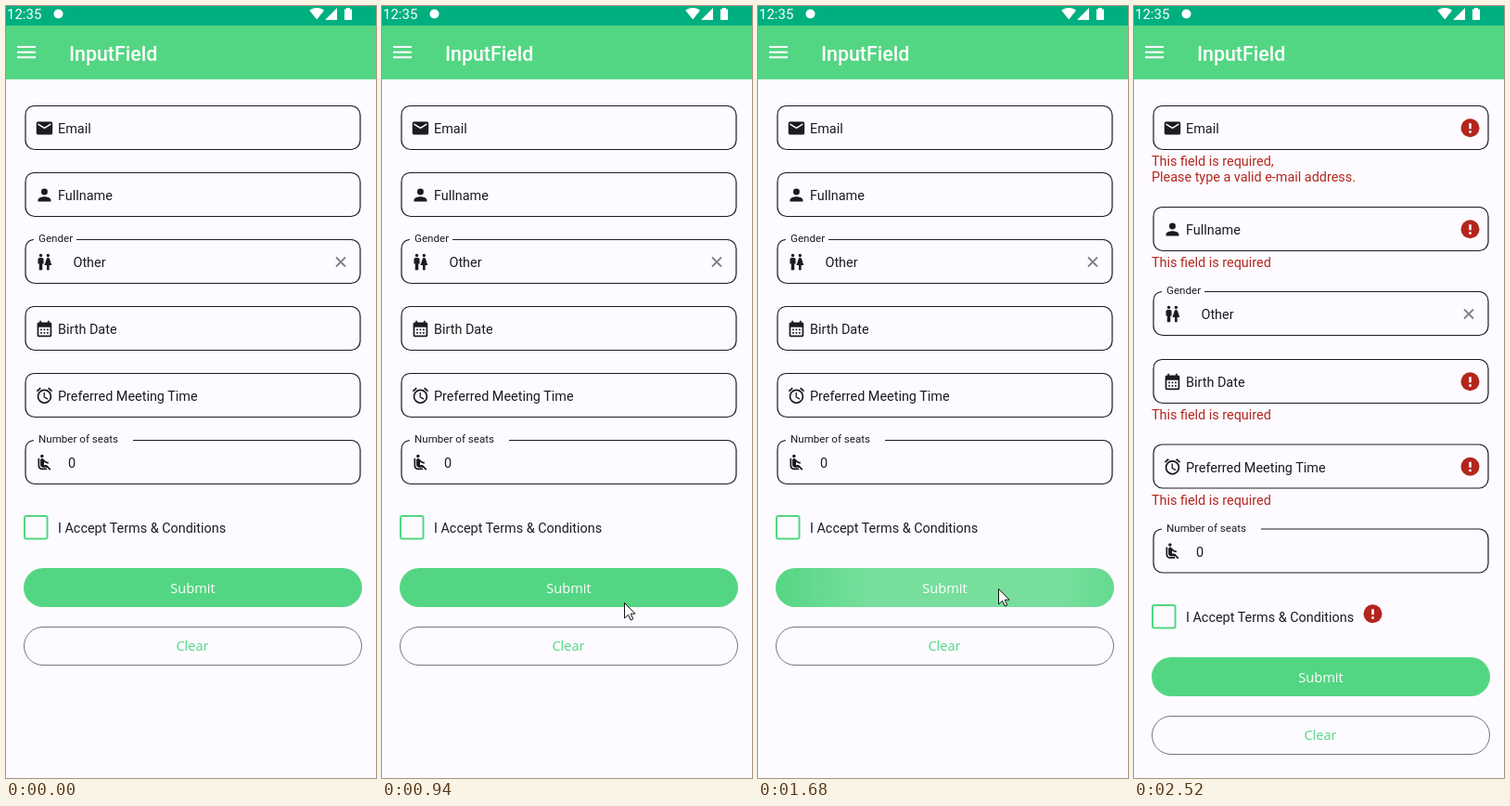
An HTML page that plays this animation: 399x831 px, repeating every 2920 ms.

```html
<!DOCTYPE html>
<html lang="en">
<head>
<meta charset="utf-8">
<title>InputField</title>
<style>
html, body { margin: 0; width: 100%; height: 100%; overflow: hidden; background: #fdfbff; }
svg { display: block; width: 399px; height: 831px; }
text { font: 14.4px Roboto, sans-serif; fill: #1b1b20; white-space: pre; }
.small { font-size: 11.6px; }
.error text { fill: #b3261e; }
.button { font: 14.6px "Open Sans", sans-serif; text-anchor: middle; }
.line { fill: none; stroke: #1b1b20; stroke-width: 1.2; }
.icon { fill: #1b1b20; fill-rule: evenodd; }
</style>
</head>
<body>
<svg id="stage" viewBox="0 0 399 831"></svg>
<script>
const LOOP = 2920, GREEN = '#53d683';
const stage = document.getElementById('stage');

const icons = {
  mail: 'M20 4H4c-1.1 0-1.99.9-1.99 2L2 18c0 1.1.9 2 2 2h16c1.1 0 2-.9 2-2V6c0-1.1-.9-2-2-2zm0 4l-8 5-8-5V6l8 5 8-5v2z',
  person: 'M12 12a4 4 0 1 0 0-8 4 4 0 0 0 0 8zm0 2c-2.67 0-8 1.34-8 4v2h16v-2c0-2.66-5.33-4-8-4z',
  gender: 'M5.5 22v-7.5H4V9c0-1.1.9-2 2-2h3c1.1 0 2 .9 2 2v5.5H9.5V22zM18 22v-6h3l-2.54-7.63A2 2 0 0 0 16.56 7h-.12a2 2 0 0 0-1.9 1.37L12 16h3v6zM7.5 6a2 2 0 1 0 0-4 2 2 0 0 0 0 4zm9 0a2 2 0 1 0 0-4 2 2 0 0 0 0 4z',
  date: 'M19 4h-1V2h-2v2H8V2H6v2H5a2 2 0 0 0-2 2v14a2 2 0 0 0 2 2h14a2 2 0 0 0 2-2V6a2 2 0 0 0-2-2zm0 16H5V10h14zM9 14H7v-2h2zm4 0h-2v-2h2zm4 0h-2v-2h2zm-8 4H7v-2h2zm4 0h-2v-2h2zm4 0h-2v-2h2z',
  alarm: 'M22 5.72l-4.6-3.86-1.29 1.53 4.6 3.86zM7.88 3.39L6.6 1.86 2 5.71l1.29 1.53zM12.5 8H11v6l4.75 2.85.75-1.23-4-2.37zM12 4a9 9 0 1 0 0 18 9 9 0 0 0 0-18zm0 16a7 7 0 1 1 0-14 7 7 0 0 1 0 14z',
  seat: 'M9 2a2 2 0 1 0 0 4 2 2 0 0 0 0-4zM6 16V7H4v9c0 2.76 2.24 5 5 5h6v-2H9c-1.66 0-3-1.34-3-3zm14 4.07L14.93 15H11.5v-3.68c1.4 1.15 3.6 2.16 5.5 2.16v-2.16c-1.66.02-3.61-.87-4.67-2.04l-1.4-1.55C10.5 7.3 9.9 7 9.25 7 8 7 7 8 7 9.25V15c0 1.66 1.34 3 3 3h5.07l3.5 3.5z'
};

const text = (x, y, s, cls = '') => `<text x="${x}" y="${y}" class="${cls}">${s}</text>`;
const badge = (x, y) => `<g class="error"><circle cx="${x}" cy="${y}" r="10" fill="#b3261e"/>
  <path d="M${x} ${y - 5}v6m0 2v2.5" stroke="#fff" stroke-width="2.5"/></g>`;
// A part that moves down by `drop` when the errors appear
const row = (drop, body) => `<g class="row" data-drop="${drop}">${body}</g>`;

// Outlined box; `gap` is where the notch for a floating label ends
function field(y, drop, icon, body, gap = 30) {
  const top = y + .5;
  return row(drop, `<path class="line" d="M${gap} ${top}H372a10 10 0 0 1 10 10v27a10 10 0 0 1-10 10H31
    a10 10 0 0 1-10-10v-27q0-9 9-10"/>
    <path class="icon" d="${icons[icon]}" transform="translate(31 ${y + 14}) scale(.87)"/>${body}`);
}

function required(y, drop, icon, label, ...errors) {
  const lines = errors.map((s, i) => text(19, y + 65 + 17 * i, s)).join('');
  return field(y, drop, icon, text(56, y + 30, label) +
    badge(362.5, y + 24.3) + `<g class="error">${lines}</g>`);
}

const missing = 'This field is required';
stage.innerHTML = `
<defs>
  <radialGradient id="glow" gradientUnits="userSpaceOnUse" cy="626">
    <stop offset=".5" stop-color="#fff"/><stop offset="1" stop-color="#fff" stop-opacity="0"/>
  </radialGradient>
</defs>
<rect width="399" height="831" fill="#fdfbff"/>
<rect width="399" height="79" fill="${GREEN}"/>
<rect width="399" height="21" fill="#00af80"/>
<g fill="#fff">
  <text x="1" y="14" style="font-size:15px;fill:#fff">12:35</text>
  <circle cx="56.5" cy="8.5" r="5"/>
  <path d="M12 21.5L23.64 7C23.2 6.66 18.7 3 12 3S.8 6.66.36 7z" transform="translate(327) scale(.68)"/>
  <path d="M344 15h13V2zM367 2h4v1.5h2V15h-8V3.500h2z"/>
  <path d="M12 43h20v2H12zm0 5.700h20v2H12zm0 5.600h20v2H12z"/>
  <text x="68" y="58.500" style="font-size:21.400px;font-weight:500;fill:#fff">InputField</text>
</g>
${required(107, 0, 'mail', 'Email', missing + ',', 'Please type a valid e-mail address.')}
${required(179, 37, 'person', 'Fullname', missing)}
${field(251, 56, 'gender', text(35, 254, 'Gender', 'small') + text(72.5, 280.5, 'Other') +
  '<path d="M356 270.500l10 10m0-10l-10 10" stroke="#858585" stroke-width="2"/>', 76)}
${required(323, 57, 'date', 'Birth Date', missing)}
${required(395, 76.5, 'alarm', 'Preferred Meeting Time', missing)}
${field(467, 95.5, 'seat', text(35, 470, 'Number of seats', 'small') + text(67, 497, '0'), 137)}
${row(96, `<rect x="20" y="549" width="24.500" height="24.500" rx="2" fill="none" stroke="${GREEN}" stroke-width="2"/>
  ${text(56, 566.5, 'I Accept Terms &amp; Conditions')}${badge(257.5, 558.2)}`)}
${row(96, `<rect x="19" y="605" width="365" height="42" rx="21" fill="${GREEN}"/>
  <rect id="ripple" x="19" y="605" width="365" height="42" rx="21" fill="url(#glow)"/>
  <text x="201.500" y="632" class="button" style="fill:#fff">Submit</text>
  <rect x="19.500" y="668.500" width="364" height="41" rx="20.500" fill="none" stroke="#79747e"/>
  <text x="201" y="694" class="button" style="fill:${GREEN}">Clear</text>`)}
<path id="cursor" d="M.5.5V17l4-3.700 2.700 5.700 2.600-1.200L7.200 12.200H12z" fill="#fff" stroke="#111" stroke-linejoin="round"/>
<circle id="click" cx="259" cy="627" r="12" fill="#f5f000" fill-opacity=".5"/>`;

const [ripple, glow, cursor, click] = ['ripple', 'glow', 'cursor', 'click'].map(id => document.getElementById(id));
const rows = stage.querySelectorAll('.row'), errors = stage.querySelectorAll('.error');
const show = (el, on) => el.setAttribute('visibility', on ? 'visible' : 'hidden');
const clamp = v => Math.max(0, Math.min(1, v));

const ticks = [0, 390, 460, 530, 590, 660, 730, 800, 870, 940, 1010, 1080, 1270,
  1470, 1540, 1610, 1680, 1750, 1820, 1890, 2100, 2170, 2240, 2310, 2380, 2450, 2520];

// Cursor path: time, x, y
const path = [[390, 336, 818], [530, 293, 736], [660, 271, 690], [870, 262, 650],
  [1080, 259, 627], [2030, 259, 627], [2240, 281, 659], [2520, 352, 840]];

function cursorAt(t) {
  const i = Math.max(1, path.findIndex(p => p[0] >= t));
  const [a, b] = [path[i - 1], path[i]], k = (t - a[0]) / (b[0] - a[0]);
  return [1, 2].map(n => Math.round(a[n] + (b[n] - a[n]) * k));
}

function draw(now) {
  const time = now % LOOP, t = ticks.findLast(v => v <= time);
  const failed = t >= 1750;
  for (const el of errors) show(el, failed);
  for (const el of rows) el.setAttribute('transform', `translate(0 ${failed ? el.dataset.drop : 0})`);

  const moving = t >= 390 && t < 2520;
  show(cursor, moving);
  if (moving) cursor.setAttribute('transform', `translate(${cursorAt(t)})`);
  show(click, t === 1270);

  const u = (t - 1470) / 70, grow = Math.max(0, u);
  const fade = 1 - clamp((t - 2030) / 490);
  glow.setAttribute('cx', 259 - 58 * clamp(u / 5));
  glow.setAttribute('r', 40 + 30 * grow + 9 * grow * grow);
  ripple.setAttribute('opacity', u < 0 ? 0 : .21 * clamp((u + 1) / 3) * fade * fade);
  requestAnimationFrame(draw);
}

const start = performance.now();
requestAnimationFrame(() => draw(0));
function loop() { draw(performance.now() - start); }
draw = (paint => now => paint(Math.max(0, performance.now() - start)))(draw);
</script>
</body>
</html>
```
